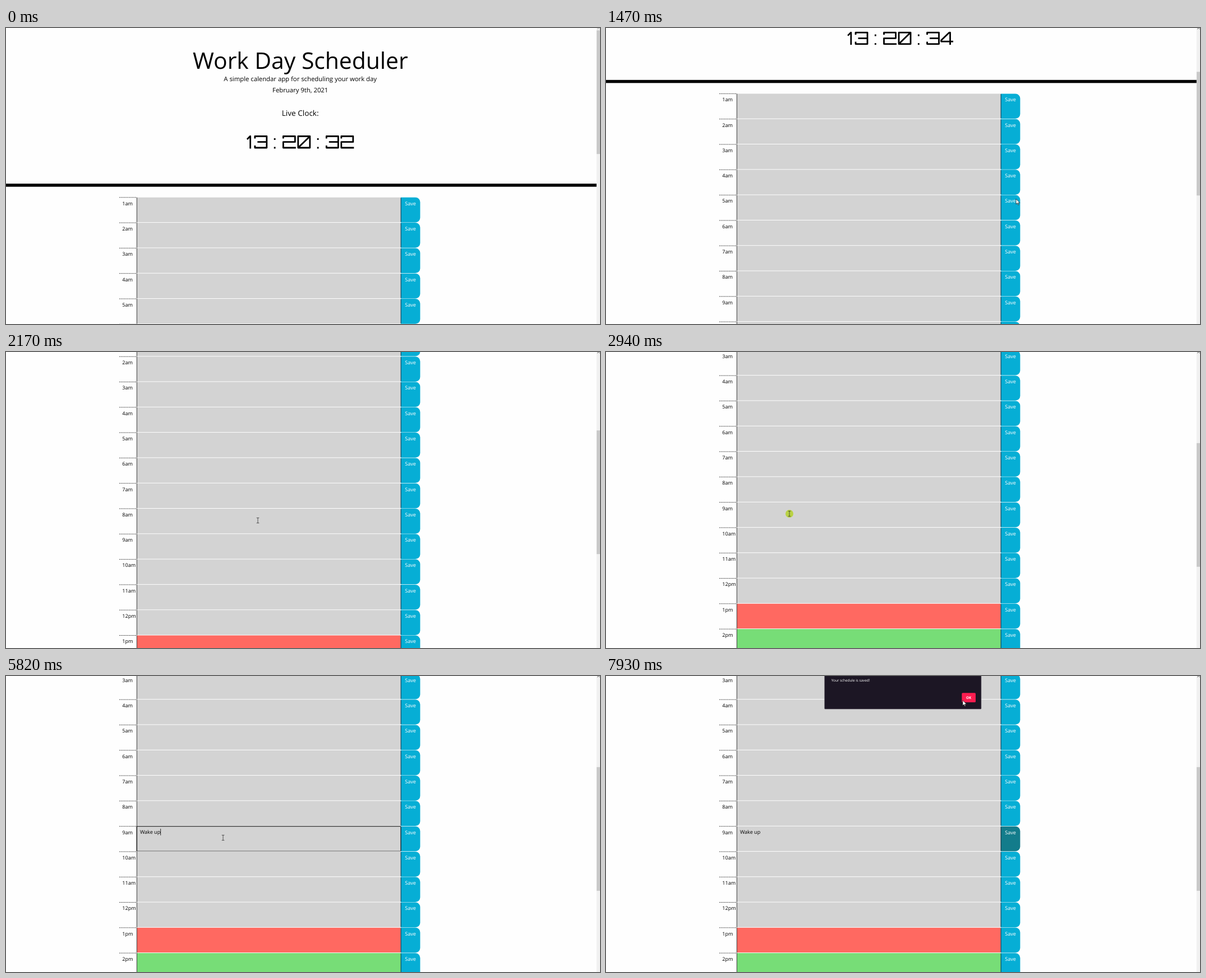
These frames come from a looping animation (1059x529 px, 8000 ms). An HTML page:

```html
<!DOCTYPE html>
<html lang="en">
<head>
<meta charset="utf-8">
<title>Work Day Scheduler</title>
<style>
  html, body { margin: 0; width: 100%; height: 100%; overflow: hidden; background: #fefefe; }
  svg { display: block; width: 1059px; height: 529px; }
  text { font: 9.06px "Open Sans", "Noto Sans", sans-serif; text-rendering: geometricPrecision; white-space: pre; }
  .mid { text-anchor: middle; }
  .title { font-size: 40.8px; }
  .lead { font-size: 11.32px; }
  .label { font-size: 13.59px; }
  .save { fill: #fff; text-anchor: middle; }
  .small { font-size: 6.37px; fill: #fff; }
  .ok { font-weight: 700; }
</style>
</head>
<body>
<svg viewBox="0 0 1059 529">
  <g id="page">
    <text class="mid title" x="524.8" y="73.3">Work Day Scheduler</text>
    <text class="mid lead" x="524.7" y="95">A simple calendar app for scheduling your work day</text>
    <text class="mid lead" x="524.7" y="115.4">February 9th, 2021</text>
    <text class="mid label" x="524.7" y="157.4">Live Clock:</text>
    <g id="clock" fill="none" stroke="#000" stroke-width="2.8" stroke-linejoin="round"></g>
    <rect y="278.2" width="1053" height="5.5"/>
    <g id="rows"></g>
    <text id="note" x="238.9" y="678.6"></text>
    <g id="focus" fill="none" stroke="#000">
      <path d="M233.2 709.5V665.3H703.8" stroke-width="1.1"/>
      <path d="M703.8 665.3V709.5H233.2" stroke-width=".6"/>
      <path id="caret" d="M0 669.5v11.8" stroke-width=".8"/>
    </g>
  </g>
  <g id="alert">
    <rect x="389.7" y="-60" width="279.2" height="119" rx="1" fill="#1c1624" stroke="#55505c" stroke-width=".6"/>
    <text class="small" x="401.8" y="10.2">Your schedule is saved!</text>
    <rect x="634.4" y="30.2" width="24.6" height="16.8" rx="1.6" fill="#fc1d50"/>
    <text class="small mid ok" x="646.7" y="40.8">OK</text>
  </g>
  <rect x="1052.8" width="7" height="529" fill="#f1f1f1"/>
  <path id="up" d="M1054.2 2l2.2-2 2.2 2" fill="none"/>
  <rect id="thumb" x="1053" y="4.2" width="7" height="221" fill="#c9c9c9"/>
  <circle id="click" r="7" fill="#b0d214" fill-opacity=".75"/>
  <g id="arrow"><path transform="scale(.566)" d="M0 0V16.5L4 13L6.5 19L9 18L6.5 12.3H12Z" fill="#fff" stroke="#111" stroke-width="1.2"/></g>
  <path id="beam" d="M-2.3-4.6H2.3M-2.3 4.6H2.3M0-4.6V4.6" fill="none" stroke="#333" stroke-width=".8"/>
</svg>
<script>
const $ = id => document.getElementById(id);
const LOOP = 8000, STEP = 80, PHASE = 30;
const ROW = 45.3, TOP = 302.5, NOTCH = 56.65, BLINK = 480;
const typed = [3970, 4270, 4430, 4740, 4980, 5210, 5370];

// Pointer moves: start, end, x, y, sideways bulge
const moves = [
  [110, 750, 760.5, 309.5], [1230, 1470, 731, 305.5], [1550, 2110, 449, 301],
  [2190, 2670, 327, 289], [3500, 3580, 387, 289], [5790, 5870, 441, 328],
  [6030, 6590, 728, 284], [7150, 7870, 636, 43.5, 95]
];

const part = (t, a, b) => Math.min(1, Math.max(0, (t - a) / (b - a)));
const smooth = p => p * p * (3 - 2 * p);
const easeOut = p => 1 - (1 - p) ** 3;

function pointer(t) {
  let x = 1018, y = 511;
  for (const [a, b, toX, toY, bulge = 0] of moves) {
    const p = smooth(part(t, a, b));
    x += (toX - x) * p - bulge * Math.sin(Math.PI * p);
    y += (toY - y) * p;
  }
  return [x, y];
}

// Six quick wheel notches, then a late one
function scrollAt(t) {
  let turns = 0;
  for (let i = 0; i < 7; i++) {
    const from = i < 6 ? 1064 + 130.3 * i : 2420;
    turns += easeOut(part(t, from, from + 150));
  }
  return turns * NOTCH;
}

// Clock glyphs: advance and strokes
const glyphs = {
  0: [26.5, "M1.5 1.5H22.5V22H1.5ZM2 21.5L22 2"],
  1: [13.2, "M.8 7L6 1.5H6.5V23.4"],
  2: [26.5, "M1.5 5.5V1.5H22.5V11.7H1.5V22H24"],
  3: [26.5, "M1.5 5.5V1.5H22.5V22H1.5V18M6 11.7H22.5"],
  4: [24, "M16 23.4V1.5H14.5L0 15.5V17.5H21.5"],
  ":": [24, "M10.3 5v3M10.3 20.4v3"]
};

function setClock(time) {
  const chars = [...time];
  const width = chars.reduce((w, c) => w + glyphs[c][0], -2.5);
  let x = 524.7 - width / 2;
  $("clock").innerHTML = chars.map(c => {
    const [advance, d] = glyphs[c];
    x += advance;
    return `<path transform="translate(${x - advance} 192)" d="${d}"/>`;
  }).join("");
}

function rowMarkup(hour) {
  const y = TOP + (hour - 1) * ROW, base = y + 14.2, end = y + ROW - .3;
  const name = (hour > 12 ? hour - 12 : hour) + (hour < 12 ? "am" : "pm");
  const fill = hour < 13 ? "#d3d3d3" : hour === 13 ? "#ff6961" : "#77dd77";
  return `<path d="M202 ${y + .3}H233" stroke="#000" stroke-width=".8" stroke-dasharray="1.7 1.13"/>
    <text x="207.3" y="${base}">${name}</text>
    <rect x="233.4" y="${y + .3}" width="470.4" height="${ROW - 1}" fill="${fill}"/>
    <path d="M233.3 ${y + .3}V${end}" stroke="#222" stroke-width=".9"/>
    <path id="btn${hour}" d="M703.8 ${y + .3}H729.9a8.5 8.5 0 0 1 8.5 8.5V${end - 8.5}a8.5 8.5 0 0 1 -8.5 8.5H703.8Z" fill="#06aed5"/>
    <path d="M704.1 ${y + 1}V${end - .8}" stroke="#012" stroke-width=".8"/>
    <text class="save" x="721" y="${base}">Save</text>`;
}
$("rows").innerHTML = Array.from({ length: 15 }, (_, i) => rowMarkup(i + 1)).join("");

const show = (id, on) => $(id).style.display = on ? "" : "none";
const place = (id, x, y) => $(id).setAttribute("transform", `translate(${x} ${y})`);

function draw(now) {
  const t = now % LOOP;
  const held = Math.floor((t - PHASE) / STEP) * STEP + PHASE;
  const scroll = scrollAt(held), [x, y] = pointer(held);

  place("page", 0, -scroll);
  place("thumb", 0, scroll * .4);
  $("up").setAttribute("stroke", scroll > 0 ? "#505050" : "#a3a3a3");
  setClock("13:20:" + (32 + Math.min(2, Math.floor((t + 880) / 1000))));

  const count = typed.filter(k => k <= t).length;
  const last = count ? typed[count - 1] : 2940;
  $("note").textContent = "Wake up".slice(0, count);
  show("focus", t >= 3020 && t < 6750);
  show("caret", Math.floor((t - last) / BLINK) % 2 === 0);
  place("caret", 239.3 + (count ? $("note").getComputedTextLength() : 0), 0);

  $("btn9").setAttribute("fill", t < 6500 ? "#06aed5" : t < 6750 ? "#138496" : "#137c8b");
  show("alert", t >= 7000);

  const beam = t < 6700 && scroll > 0 && x > 233 && x < 704;
  show("arrow", t >= 120 && !beam);
  show("beam", beam);
  show("click", (t >= 2940 && t < 3110) || (t >= 6750 && t < 6930));
  for (const id of ["arrow", "beam", "click"]) place(id, x, y);
}

const start = performance.now();
function tick() {
  draw(performance.now() - start);
  requestAnimationFrame(tick);
}
tick();
</script>
</body>
</html>
```
